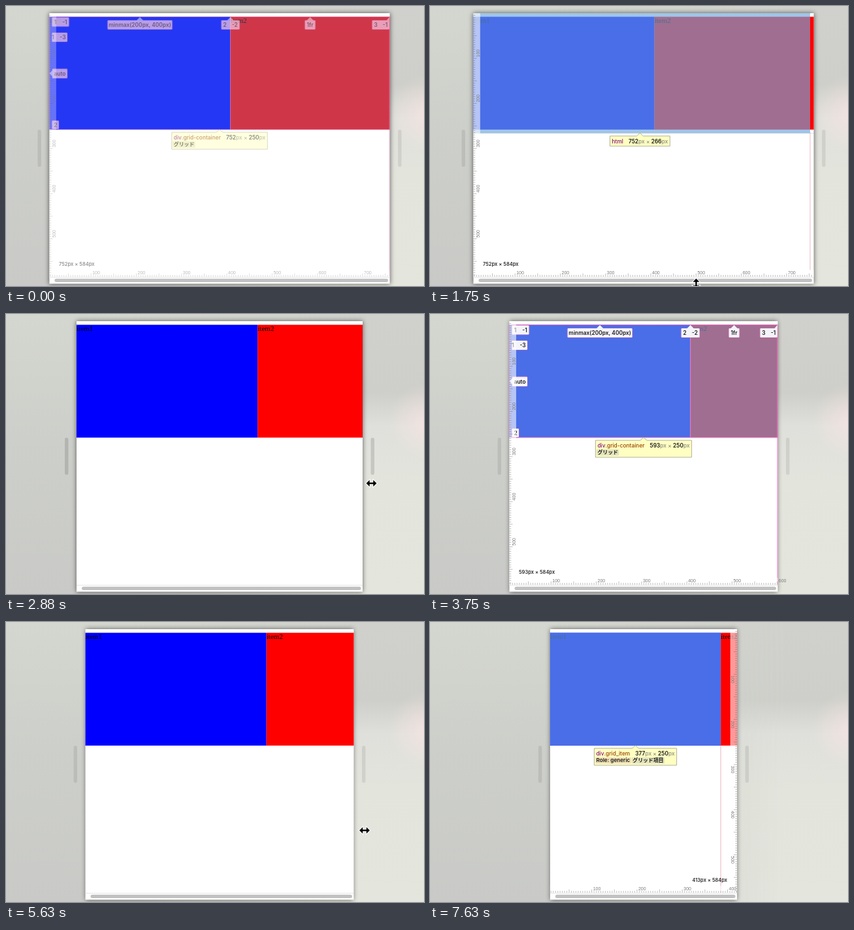
An HTML page with a canvas for the animation above (8 s loop, 640x430 px).

```html
<!DOCTYPE html>
<html lang="ja">
<head>
<meta charset="utf-8">
<style>
html, body { margin: 0; width: 100%; height: 100%; overflow: hidden; }
body { position: relative; background: linear-gradient(#d4d7cf, #cdcfca 45%, #c9cac7); }
body::before {
  content: ""; position: absolute; inset: 0;
  background: radial-gradient(circle at 645px 165px, #ffe6e699, #ffe6e600 60px),
    linear-gradient(#d0d1cc, #cecfca 28%, #dfe0db 40%, #e3e4dc 60%, #e4e5dd);
  mask-image: linear-gradient(90deg, transparent 30%, #000 85%);
  -webkit-mask-image: linear-gradient(90deg, transparent 30%, #000 85%);
}
canvas { position: absolute; left: 0; top: 0; }
</style>
</head>
<body>
<canvas id="c" width="640" height="430"></canvas>
<script>
const ctx = document.getElementById('c').getContext('2d');
const LOOP = 8000, STEP = 125, S = 0.693, MID = 327, TOP = 11;
const ROW = TOP + 8 * S, ROW_END = ROW + 250 * S, PAGE_END = TOP + 584 * S;
const UI = 'Inter, sans-serif', CJK = '"Noto Sans CJK JP", "Noto Sans CJK", sans-serif';
const INK = '#1c1c1c', DIM = '#8c8c80', PURPLE = '#881280', BROWN = '#994500';

// [time, viewport width in page pixels]
const WIDTHS = [[0, 752], [2250, 752], [2875, 632], [3125, 614], [3375, 593],
  [5750, 593], [6375, 427], [6625, 413]];
// [time, overlay, opacity]
const OVERLAYS = [[0, 'grid', .5], [125, '', 0], [500, 'grid', .5], [625, 'grid', 1],
  [1500, 'html', 1], [1875, 'html', .4], [2000, '', 0], [3500, 'grid', .5], [3625, 'grid', 1],
  [5000, 'size', 1], [5125, 'size', .4], [5250, '', 0], [7125, 'item', .4], [7250, 'item', 1]];
// [time, x, y] for each cursor appearance
const UP_DOWN = [[[1625, 375, 428], [1875, 440, 425]], [[5250, 400, 428], [5500, 450, 425]]];
const SIDEWAYS = [
  [[2125, 602, 310], [2250, 603, 259], [2875, 559.5, 260], [3125, 551, 262], [3250, 548, 300]],
  [[5625, 549, 320], [5750, 549, 259], [6375, 491.5, 259], [6625, 489, 260], [6750, 484, 285]]];

function at(keys, t, i = 1) {
  const n = keys.findIndex(k => k[0] > t);
  if (n < 0) return keys[keys.length - 1][i];
  if (n === 0) return keys[0][i];
  const a = keys[n - 1], b = keys[n];
  return a[i] + (b[i] - a[i]) * (t - a[0]) / (b[0] - a[0]);
}

function rect(x, y, x2, y2, fill) {
  ctx.fillStyle = fill;
  ctx.fillRect(x, y, x2 - x, y2 - y);
}

function pill(x, y, w, h, r, fill) {
  ctx.fillStyle = fill;
  ctx.beginPath();
  ctx.roundRect(x, y, w, h, r);
  ctx.fill();
}

function line(x, y, x2, y2, color, width = 1) {
  ctx.strokeStyle = color;
  ctx.lineWidth = width;
  ctx.beginPath();
  ctx.moveTo(x, y);
  ctx.lineTo(x2, y2);
  ctx.stroke();
}

function poly(points, fill) {
  ctx.beginPath();
  points.forEach(p => ctx.lineTo(...p));
  ctx.closePath();
  if (fill) { ctx.fillStyle = fill; ctx.fill(); }
}

function text(s, x, y, font, color = INK, align = 'left') {
  ctx.font = font;
  ctx.fillStyle = color;
  ctx.textAlign = align;
  ctx.textBaseline = 'alphabetic';
  ctx.fillText(s, x, y);
}

function drawWindow(v, dragging) {
  const { x0, x1, split } = v;
  const grip = `rgba(0,0,0,${dragging ? .12 : .08})`;
  pill(x0 - 18, 190, 5.5, 57, 2.7, grip);
  pill(x1 + 12.5, 190, 5.5, 57, 2.7, grip);
  ctx.save();
  ctx.shadowColor = 'rgba(0,0,0,.6)';
  ctx.shadowBlur = 7;
  rect(x0, TOP, x1, 426.5, '#fff');
  ctx.restore();
  rect(x0, ROW, split, ROW_END, '#00f');
  rect(split, ROW, x1, ROW_END, '#f00');
  ctx.save();
  ctx.beginPath();
  ctx.rect(x0, TOP, x1 - x0, 415);
  ctx.clip();
  const serif = '11.1px "Liberation Serif", serif';
  text('item1', x0, 26.3, serif, '#000');
  text('item2', split, 26.3, serif, '#000');
  ctx.restore();
  line(x0, 416.5, x1, 416.5, '#e6e6e6');
  pill(x0 + 8, 418.7, x1 - x0 - 10.5, 5.2, 2.6, '#c1c1c1');
}

// Chip holding [text, x] entries; tip is the point it refers to.
function chip(x, y, x2, y2, entries, tip) {
  ctx.save();
  ctx.shadowColor = 'rgba(240,90,180,.9)';
  ctx.shadowBlur = 2.5;
  pill(x, y, x2 - x, y2 - y, 1, '#f4f4fa');
  ctx.restore();
  if (tip) poly(tip, '#f4f4fa');
  const mid = (y + y2) / 2 + 3;
  entries.forEach(([s, cx]) => text(s, cx, mid, '600 8.4px ' + UI, INK, 'center'));
}

function drawGrid({ x0, x1, split }) {
  const pink = '#f07cc8', up = x => [[x - 5, 22], [x, 17], [x + 5, 22]];
  [ROW, ROW_END].forEach(y => line(x0, y, x1, y, pink));
  [x0 + .5, split].forEach(x => line(x, ROW, x, ROW_END, pink));
  line(x1 - .5, ROW, x1 - .5, PAGE_END, pink);
  chip(x0 + 4, 17.5, x0 + 30, 31.5, [['1', x0 + 9], ['-1', x0 + 23.5]]);
  chip(x0 + 4, 41, x0 + 27.5, 55, [['1', x0 + 5.5], ['-3', x0 + 20.5]]);
  chip(x0 + 4.5, 96.5, x0 + 27.5, 111, [['auto', x0 + 16]],
    [[x0 + 4.5, 99], [x0, 103.5], [x0 + 4.5, 108]]);
  chip(x0 + 4, 176, x0 + 14.5, 189, [['2', x0 + 9.5]]);
  const c1 = (x0 + split) / 2, c2 = (split + x1) / 2;
  chip(c1 - 49.5, 22, c1 + 49.5, 36, [['minmax(200px, 400px)', c1]], up(c1));
  chip(split - 14, 22, split + 14, 36, [['2', split - 8.5], ['-2', split + 6.7]], up(split));
  chip(c2 - 8, 22, c2 + 8, 36, [['1fr', c2]], up(c2));
  chip(x1 - 27, 22, x1 - .5, 36, [['3', x1 - 21.5], ['-1', x1 - 7]],
    [[x1 - 5, 22], [x1 - .5, 17], [x1 - .5, 22]]);
}

function drawRulers({ x0, x1, width }, right, top) {
  const tick = 'rgba(70,70,70,.6)', digits = '7px "Liberation Sans", sans-serif', gray = '#7b7b7b';
  const edge = right ? x1 : x0, inward = right ? -1 : 1;
  const base = top ? TOP : PAGE_END, down = top ? 1 : -1;
  const length = n => n % 50 ? 2.8 : 5;
  ctx.fillStyle = 'rgba(255,255,255,.6)';
  ctx.fillRect(right ? x1 - 10.4 : x0, TOP, 10.4, PAGE_END - TOP);
  ctx.fillRect(x0, top ? TOP : PAGE_END - 10.4, x1 - x0, 10.4);
  for (let n = 5; n < 584; n += 5) {
    const y = TOP + n * S;
    line(edge, y, edge + inward * length(n), y, tick, .6);
    if (n % 100) continue;
    ctx.save();
    ctx.translate(edge + inward * (right ? 9.3 : 9.5), y - inward * 1.8);
    ctx.rotate(-inward * Math.PI / 2);
    text(n, 0, 0, digits, gray);
    ctx.restore();
  }
  // The page is scrolled 8 px to the right.
  for (let n = 10; n < width + 8; n += 5) {
    const x = x0 + (n - 8) * S;
    line(x, base, x, base + down * length(n), tick, .6);
    if (n % 100 === 0) text(n, x + 2, top ? 20 : 411.6, digits, gray);
  }
  const size = `${width}px × 584px`, font = '500 7.6px ' + UI;
  if (top) pill(x0 + 12.5, 24.5, 58, 12, 2, 'rgba(255,255,255,.65)');
  text(size, right ? x1 - 15 : x0 + 14.5, top ? 33.2 : 399.2, font, '#111', right ? 'right' : 'left');
}

function drawTip(cx, y, name, cls, w, h, badges = []) {
  const parts = [[name, PURPLE, 500], [cls, BROWN, 500], [w, INK, 600], ['px × ', DIM, 500],
    [h, INK, 600], ['px', DIM, 500]].map(([s, color, weight]) => {
    const font = `${weight} 8.4px ${UI}`;
    ctx.font = font;
    return { s: String(s), color, font, w: ctx.measureText(s).width };
  });
  const wide = parts.reduce((sum, p) => sum + p.w, 8) + 6;
  const x = cx - wide / 2, y2 = y + (badges.length ? 26 : 15.5), a = cx;
  poly([[x, y], [a - 5, y], [a, y - 4.5], [a + 5, y], [x + wide, y], [x + wide, y2], [x, y2]], '#ffffc2');
  ctx.strokeStyle = '#a0a08c';
  ctx.lineWidth = .8;
  ctx.stroke();
  let px = x + 3;
  parts.forEach((p, i) => {
    if (i === 2) px += 8;
    text(p.s, px, y + 11, p.font, p.color);
    px += p.w;
  });
  px = x + 3;
  badges.forEach(([s, font, fill]) => {
    ctx.font = font;
    const bw = ctx.measureText(s).width;
    pill(px - 1.5, y + 14, bw + 3, 9.5, 1, fill);
    text(s, px, y + 21.4, font);
    px += bw + 4;
  });
}

function drawOverlay(v, mode) {
  const { x0, x1, split, width } = v, jp = '700 7.9px ' + CJK;
  const content = 'rgba(111,168,220,.66)', guide = 'rgba(200,70,95,.5)';
  if (mode === 'grid') {
    rect(x0, ROW, x1, ROW_END, content);
    drawGrid(v);
  } else if (mode === 'html') {
    const end = x1 - 8 * S;
    rect(x0, TOP, end, ROW_END + 8 * S, content);
    line(end, ROW_END + 5, end, PAGE_END - 10, guide, .7);
    line(x0, ROW_END + 5.5, x1, ROW_END + 5.5, 'rgba(120,130,150,.4)', .6);
  } else if (mode === 'item') {
    rect(x0, ROW, split, ROW_END, content);
    line(split, ROW_END, split, PAGE_END, guide, .8);
  }
  drawRulers(v, mode === 'item', mode === 'size');
  if (mode === 'grid') {
    drawTip(MID, 194, 'div', '.grid-container', width, 250, [['グリッド', jp, '#e4e4bc']]);
  } else if (mode === 'html') {
    drawTip(MID - 8 * S, 199.7, 'html', '', width, 266);
  } else if (mode === 'item') {
    drawTip((x0 + split) / 2, 194, 'div', '.grid_item', v.first, 250,
      [['Role: generic', '600 8.2px ' + UI, '#f0dfb4'], ['グリッド項目', jp, '#e4e4bc']]);
  }
}

function drawCursor(paths, t, angle) {
  const path = paths.find(p => t >= p[0][0] && t <= p[p.length - 1][0]);
  if (!path) return;
  ctx.save();
  ctx.translate(at(path, t, 1), at(path, t, 2));
  ctx.rotate(angle);
  poly([[-8, 0], [-2.8, -5], [-2.8, -1.2], [2.8, -1.2], [2.8, -5], [8, 0],
    [2.8, 5], [2.8, 1.2], [-2.8, 1.2], [-2.8, 5]]);
  ctx.strokeStyle = '#fff';
  ctx.lineWidth = 2;
  ctx.stroke();
  ctx.fillStyle = '#000';
  ctx.fill();
  ctx.restore();
}

function draw(now) {
  const t = Math.floor(now % LOOP / STEP) * STEP;
  const width = Math.round(at(WIDTHS, t)), half = width * S / 2;
  const first = Math.min(400, width - 36);
  const v = { width, first, x0: MID - half, x1: MID + half, split: MID - half + first * S };
  const [, mode, alpha] = OVERLAYS.filter(o => o[0] <= t).pop();
  ctx.clearRect(0, 0, 640, 430);
  drawWindow(v, t >= 2250 && t < 3375 || t >= 5750 && t < 6750);
  ctx.globalAlpha = alpha;
  if (mode) drawOverlay(v, mode);
  ctx.globalAlpha = 1;
  drawCursor(UP_DOWN, t, Math.PI / 2);
  drawCursor(SIDEWAYS, t, 0);
}

let start;
function frame(now) {
  start ??= now;
  draw(now - start);
  requestAnimationFrame(frame);
}
requestAnimationFrame(frame);
</script>
</body>
</html>
```
